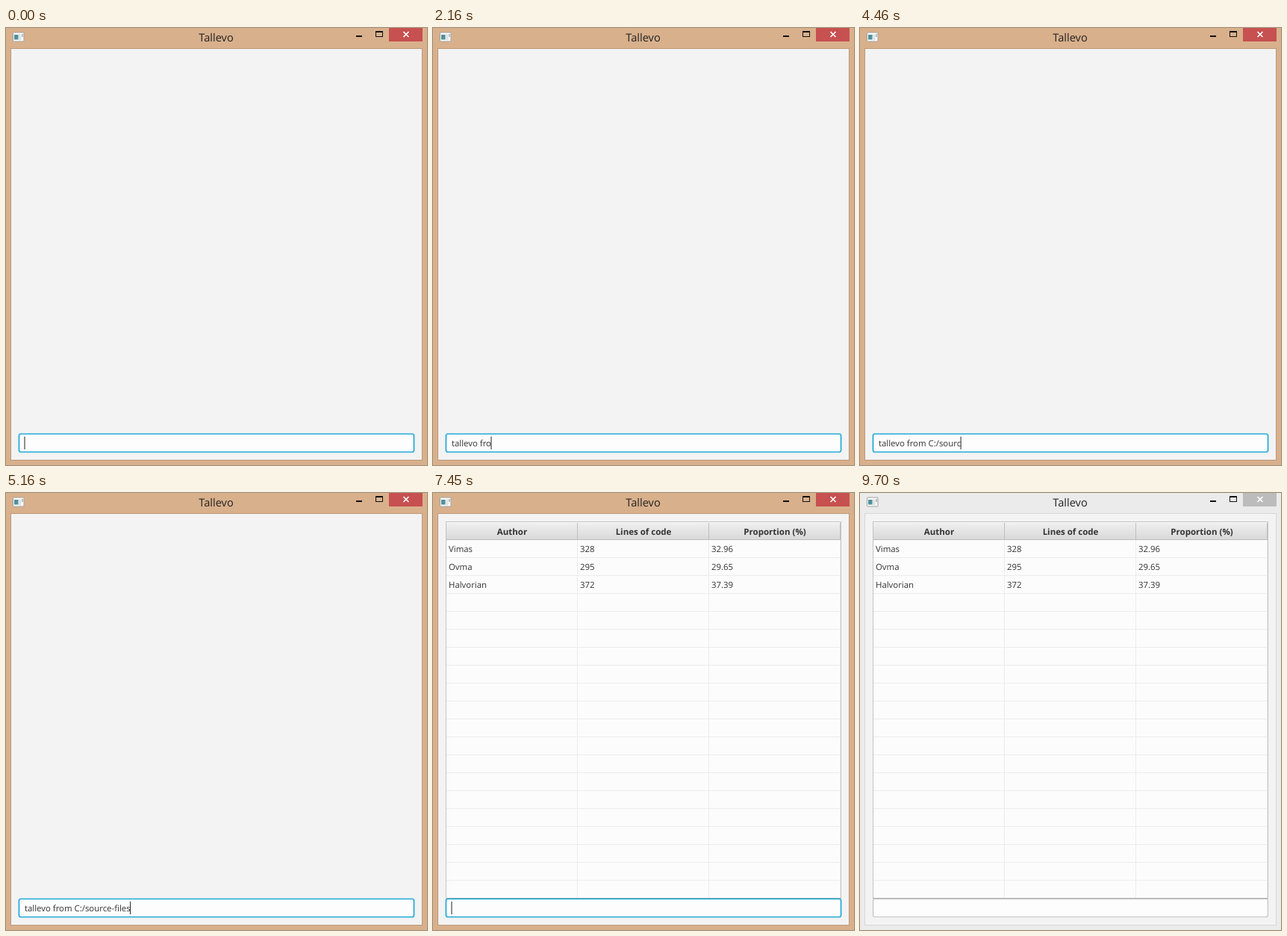
An HTML page that plays this animation: 564x585 px, repeating every 9.81 s.

```html
<!DOCTYPE html>
<html lang="en">
<head>
<meta charset="utf-8">
<title>Tallevo</title>
<style>
  html, body { margin: 0; width: 564px; height: 585px; overflow: hidden; }
  svg {
    display: block;
    --frame: #d9b08c; --edge: #bd997a; --close: #c75050; --field: #039ed3;
    font: 11.4px "Open Sans", "Noto Sans", sans-serif;
    text-rendering: geometricPrecision;
  }
  svg.inactive { --frame: #ebebeb; --edge: #d8d8d8; --close: #bcbcbc; --field: #c4c4c4; }
  .inactive #glow { display: none; }
  text { fill: #333; white-space: pre; }
  .mid { text-anchor: middle; }
  .head { font-weight: 700; font-size: 11.5px; }
</style>
</head>
<body>
<svg id="stage" width="564" height="585" viewBox="0 0 564 585">
  <defs>
    <linearGradient id="header" x2="0" y2="1">
      <stop stop-color="#f0f0f0"/>
      <stop offset="1" stop-color="#d9d9d9"/>
    </linearGradient>
  </defs>

  <rect width="564" height="585" fill="var(--frame)"/>
  <rect x="6.5" y="27.5" width="551" height="551" fill="#f3f3f3" stroke="var(--edge)"/>

  <!-- title bar -->
  <rect x="9.5" y="6" width="14.5" height="12" rx="1" fill="#fafafa" stroke="#a3a39e"/>
  <rect x="11" y="9" width="5.5" height="6.5" fill="#4f919c"/>
  <rect x="17" y="8.5" width="3.5" height="8" fill="#dfe3e4"/>
  <rect x="21" y="8" width="2" height="4" fill="#b9c0c2"/>
  <text class="mid" x="281.5" y="18" font-size="14.6" style="fill:#222">Tallevo</text>
  <path d="M469 10h8v2h-8z" fill="#111"/>
  <path d="M495 4h10v8h-10zM496 6v5h8v-5z" fill="#111" fill-rule="evenodd"/>
  <rect x="513" width="45" height="18" fill="var(--close)"/>
  <path d="M532.5 5l7 7M539.5 5l-7 7" stroke="#fff" stroke-width="1.7"/>

  <g id="table">
    <rect x="17.5" y="38.5" width="529" height="504.5" fill="#fcfcfc" stroke="#c4c4c4"/>
    <rect x="18" y="39" width="528" height="23" fill="url(#header)"/>
    <path d="M18 62.5h528M193.5 39v24M369.5 39v24M545.5 39v24" stroke="#bebebe"/>
    <path d="M18 39.5h528" stroke="#f8f8f8"/>
    <path id="grid" stroke="#ececec"/>
    <path d="M17 542.5h530" stroke="#b4b4b4"/>
  </g>

  <!-- command field -->
  <rect id="glow" x="17.5" y="543.5" width="529" height="24" rx="2.5" fill="none" stroke="#039ed3" stroke-opacity=".2" stroke-width="3.4"/>
  <rect x="17.5" y="543.5" width="529" height="24" rx="2.5" fill="#fdfdfd" stroke="var(--field)" stroke-width="1.2"/>
  <rect x="19" y="545" width="526" height="21" rx="1.5" fill="none" stroke="var(--field)" stroke-opacity=".12"/>
  <text id="input" x="25" y="560"></text>
  <rect id="caret" y="547" width="1" height="17" fill="#222"/>
</svg>
<script>
const [stage, table, grid, input, caret] =
  ["stage", "table", "grid", "input", "caret"].map(id => document.getElementById(id));

const LOOP = 9810, SUBMIT = 5710, BLUR = 9700;
const COMMAND = "tallevo from C:/source-files";
// moment at which each character of the command appears
const KEYS = [
  950, 1040, 1310, 1406, 1502, 1598, 1694, 1790,
  1980, 1980, 2160, 2250, 2340, 2710, 3290, 3570,
  3940, 3970, 4120, 4180, 4370, 4470, 4570, 4670,
  4820, 4970, 5065, 5160
];
const CARET_OFF = [
  [90, 580], [3200, 3290], [5950, 6460], [6960, 7450],
  [7950, 8470], [8940, 9430], [BLUR, LOOP]
];
const ROWS = [
  ["Vimas", "328", "32.96"],
  ["Ovma", "295", "29.65"],
  ["Halvorian", "372", "37.39"]
];

function label(text, x, y, style = "") {
  const el = document.createElementNS(stage.namespaceURI, "text");
  el.textContent = text;
  el.setAttribute("x", x);
  el.setAttribute("y", y);
  el.setAttribute("class", style);
  table.append(el);
}

["Author", "Lines of code", "Proportion (%)"].forEach((name, col) =>
  label(name, 106 + 176 * col, 56, "mid head"));
ROWS.forEach((row, r) => row.forEach((cell, col) =>
  label(cell, 21 + 176 * col, 79 + 24 * r)));

let lines = "M193.5 63v479M369.5 63v479M545.5 63v479";
for (let y = 86.5; y < 540; y += 24) lines += `M18 ${y}h528`;
grid.setAttribute("d", lines);

function draw(t) {
  const done = t >= SUBMIT;
  const typed = done ? 0 : KEYS.filter(k => k <= t).length;
  input.textContent = COMMAND.slice(0, typed);
  const width = typed ? input.getComputedTextLength() : 0;
  caret.setAttribute("x", 24.5 + width);
  const hidden = CARET_OFF.some(([from, to]) => t >= from && t < to);
  caret.style.display = hidden ? "none" : "";
  table.style.display = done ? "" : "none";
  stage.classList.toggle("inactive", t >= BLUR);
}

const start = performance.now();
function tick() {
  draw((performance.now() - start) % LOOP);
  requestAnimationFrame(tick);
}
tick();
</script>
</body>
</html>
```
